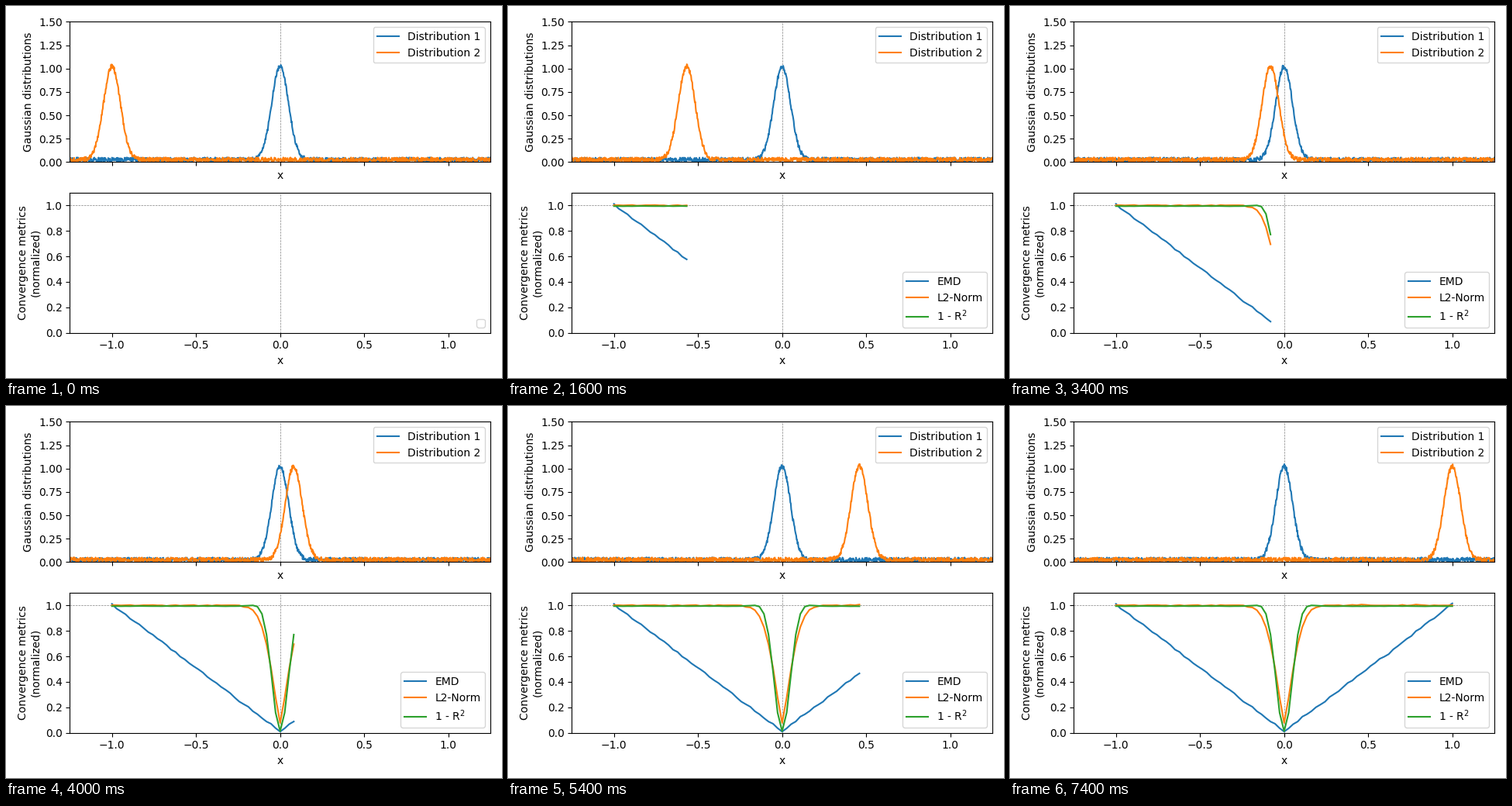
Animation of 640x480 px, one loop 7.5 s. Source, as a matplotlib script:

```python
import numpy as np
import matplotlib.pyplot as plt
from matplotlib.animation import FuncAnimation

FRAMES = 75
SIGMA = 0.05
NOISE = 0.05

x = np.linspace(-1.25, 1.25, 1000)
centers = np.linspace(-1, 1, FRAMES)
rng = np.random.default_rng(7)


def noisy_gauss(mu):
    bell = np.exp(-0.5 * ((x - mu) / SIGMA) ** 2)
    return bell + rng.uniform(0, NOISE, x.size)


pairs = [(noisy_gauss(0), noisy_gauss(mu)) for mu in centers]

# The distance grows linearly with the shift, plus a small sampling ripple
emd = np.abs(centers) + rng.normal(0.009, 0.004, FRAMES)
l2 = np.array([np.linalg.norm(p - q) for p, q in pairs])
l2 /= np.median(l2)
r2 = np.array([np.corrcoef(p, q)[0, 1] ** 2 for p, q in pairs])
metrics = [emd, l2, 1 - r2]

fig, (top, low) = plt.subplots(2, 1, sharex=True, figsize=(6.4, 4.8), dpi=100)
guide = dict(color="gray", linestyle="--", linewidth=0.5)

for ax in (top, low):
    ax.axvline(0, **guide)
    ax.set_xlabel("x")
low.axhline(1, **guide)

top.set_xlim(-1.25, 1.25)
top.set_ylim(0, 1.5)
top.set_ylabel("Gaussian distributions")
low.set_ylim(0, 1.1)
low.set_ylabel("Convergence metrics\n(normalized)")


def add_lines(ax, names):
    return [ax.plot([], [], color=f"C{i}", label=name)[0]
            for i, name in enumerate(names)]


curves = add_lines(top, ["Distribution 1", "Distribution 2"])
traces = add_lines(low, ["EMD", "L2-Norm", "1 - R$^2$"])
top.legend(handles=curves, loc="upper right")
fig.tight_layout()


def update(k):
    for curve, y in zip(curves, pairs[k]):
        curve.set_data(x, y)
    n = k + 1 if k else 0
    for trace, y in zip(traces, metrics):
        trace.set_data(centers[:n], y[:n])
    low.legend(handles=traces if k else [], loc="lower right")
    return curves + traces


anim = FuncAnimation(fig, update, frames=FRAMES, interval=100,
                     repeat=True, repeat_delay=0, blit=False)
plt.show()
```
